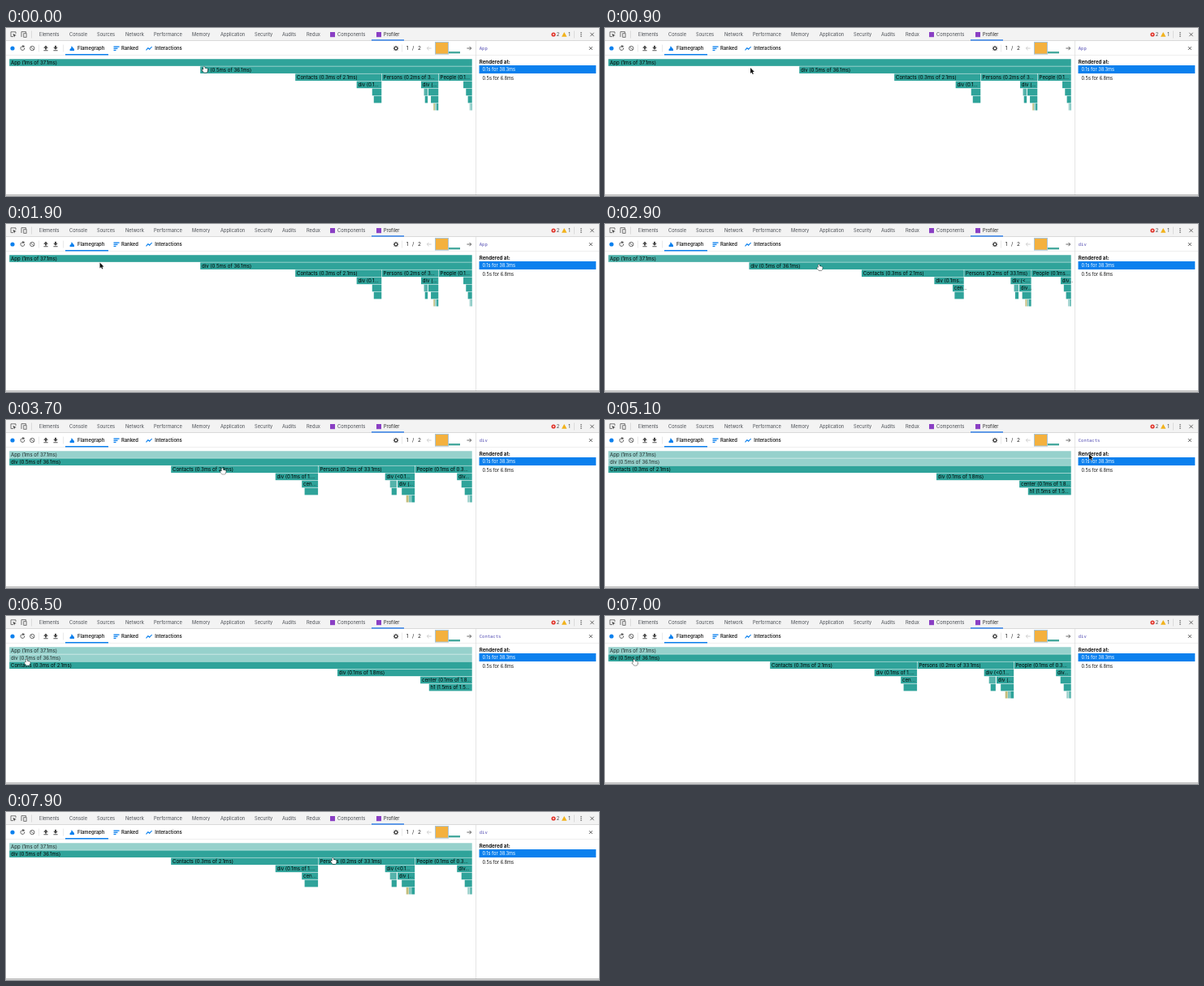
Animation of 730 by 207 pixels, one loop 8 s. Source, as an HTML page with a canvas:

```html
<!DOCTYPE html>
<html lang="en">
<head>
<meta charset="utf-8">
<title>Profiler flamegraph</title>
<style>
  html, body { margin: 0; width: 100%; height: 100%; overflow: hidden; background: #fff; }
  canvas { display: block; width: 730px; height: 207px; }
</style>
</head>
<body>
<canvas id="stage"></canvas>
<script>
const W = 730, H = 207, LOOP = 8000, STEP = 100;
const LEFT = 4, RIGHT = 574, TOP = 38, ROW = 9.1, ZOOM_MS = 250, MIN_LABEL = 18;
const SANS = 'Inter, sans-serif', MONO = '"DejaVu Sans Mono", monospace';
const TEAL = '#2fa39a', BLUE = '#0b80ee', INK = '#3c4043', PURPLE = '#8a3fc4';

const canvas = document.getElementById('stage');
const ctx = canvas.getContext('2d');
const dpr = window.devicePixelRatio || 1;
canvas.width = W * dpr;
canvas.height = H * dpr;

// Each view shows the span [from, to] across the full chart width.
const APP = { name: 'App', row: 0, from: -395.8, to: 574 };
const DIV = { name: 'div', row: 1, from: 4, to: 574 };
const CONTACTS = { name: 'Contacts', row: 2, from: 203, to: 384.4 };
const CLICKS = [
  { at: -1000, view: APP }, { at: 2816, view: DIV },
  { at: 3860, view: CONTACTS }, { at: 6750, view: DIV }
];

const bar = (row, from, to, label = '', color = TEAL) => ({ row, from, to, label, color });
const BARS = [
  bar(0, -395.8, 574, 'App (1ms of 37.1ms)'),
  bar(1, 4, 574, 'div (0.5ms of 36.1ms)'),
  bar(2, 203, 384.4, 'Contacts (0.3ms of 2.1ms)'),
  bar(2, 384.4, 503.5, 'Persons (0.2ms of 33.1ms)'),
  bar(2, 503.5, 574, 'People (0.1ms of 0.3ms)'),
  bar(3, 331.5, 384.4, 'div (0.1ms of 1.8ms)'),
  bar(3, 466.5, 503.5, 'div (<0.1ms of 32.9ms)'),
  bar(3, 555, 574, 'div (0.1ms of 0.2ms)'),
  bar(4, 364, 384.4, 'center (0.1ms of 1.8ms)'),
  bar(4, 472.5, 481.2, '', '#55b3ab'),
  bar(4, 481.8, 503.5, 'div (0.2ms of 21ms)'),
  bar(4, 560.5, 574),
  bar(5, 367.4, 384.4, 'h1 (1.5ms of 1.5ms)'),
  bar(5, 474.5, 481.2),
  bar(5, 487, 503.5),
  bar(5, 564.5, 574),
  bar(6, 492.5, 496, '', '#c3bd7c'),
  bar(6, 496, 499, '', '#6dbdb5'),
  bar(6, 499, 503.5),
  bar(6, 568, 571, '', '#9bd0cb'),
  bar(6, 571, 574, '', '#55b3ab')
];

// Pointer hot spot: time, x, y.
const POINTER = [
  [0, 244.5, 47.6], [400, 240, 49], [1400, 118, 49], [1600, 118, 49], [1900, 115.5, 47.6],
  [2700, 264, 50], [3000, 264, 50], [3700, 267, 59.5], [4100, 267, 59.5], [5100, 596, 42],
  [5600, 560, 66], [6000, 240, 110], [6300, 7, 76], [6500, 26, 53.5],
  [6900, 26, 53.5], [7900, 403, 56.8], [8000, 403, 56.8]
];

const mix = (a, b, p) => a + (b - a) * p;
const clamp = (v, lo, hi) => Math.min(hi, Math.max(lo, v));
const ease = p => p * p * (3 - 2 * p);

function rect(x, y, w, h, color) {
  ctx.fillStyle = color;
  ctx.fillRect(x, y, w, h);
}

function text(str, x, y, size, color = INK, weight = 400, family = SANS) {
  ctx.font = `${weight} ${size}px ${family}`;
  ctx.fillStyle = color;
  ctx.fillText(str, x, y);
}

function line(points, color = '#444', width = 0.8) {
  ctx.beginPath();
  points.forEach(([x, y]) => ctx.lineTo(x, y));
  ctx.strokeStyle = color;
  ctx.lineWidth = width;
  ctx.stroke();
}

function shape(points, fill) {
  ctx.beginPath();
  points.forEach(([x, y]) => ctx.lineTo(x, y));
  ctx.closePath();
  ctx.fillStyle = fill;
  ctx.fill();
}

function dot(x, y, r, color) {
  ctx.beginPath();
  ctx.arc(x, y, r, 0, 7);
  ctx.fillStyle = color;
  ctx.fill();
}

function ring(x, y, r, color = '#444', from = 0, to = 2 * Math.PI, width = 0.8) {
  ctx.beginPath();
  ctx.arc(x, y, r, from, to);
  ctx.strokeStyle = color;
  ctx.lineWidth = width;
  ctx.stroke();
}

function cross(x, y, r, color = '#444', width = 0.8) {
  line([[x - r, y - r], [x + r, y + r]], color, width);
  line([[x + r, y - r], [x - r, y + r]], color, width);
}

function arrowIcon(x, y, dir, color) {
  line([[x - 2.6, y], [x + 2.6, y]], color);
  line([[x + dir * 0.5, y - 2.2], [x + dir * 2.7, y], [x + dir * 0.5, y + 2.2]], color);
}

function drawTabs() {
  rect(0, 0, W, 15.5, '#f3f3f3');
  rect(0, 15, W, 0.7, '#cccccc');
  line([[9, 10.6], [6, 10.6], [6, 4.8], [12, 4.8], [12, 7]], '#555');
  shape([[8.4, 7], [12.8, 9], [10.9, 9.6], [10.2, 11.6]], '#444');
  line([[19, 11], [19, 4.6], [24.5, 4.6], [24.5, 6.2]], '#555');
  ctx.strokeRect(21.8, 6.7, 3.3, 4.6);
  rect(31, 3.5, 0.6, 9, '#cccccc');

  const tabs = { Elements: 41, Console: 78, Sources: 112, Network: 147, Performance: 182, Memory: 229,
    Application: 264, Security: 306, Audits: 340, Redux: 370, Components: 408, Profiler: 465 };
  for (const [name, x] of Object.entries(tabs)) {
    text(name, x, 10.2, 5.7, name === 'Profiler' ? '#222' : '#484c52');
  }
  for (const x of [399, 456]) rect(x, 5, 6, 6.2, PURPLE);
  rect(450, 14.3, 40, 1.3, '#1a73e8');

  dot(674, 8, 2.6, '#e0352b');
  cross(674, 8, 1, '#fff', 0.6);
  text('2', 677.8, 10.2, 5.8);
  shape([[687.2, 5], [690.4, 10.8], [684, 10.8]], '#f2b21b');
  text('1', 692.2, 10.2, 5.8);
  rect(699, 3.5, 0.6, 9, '#cccccc');
  for (const y of [5.7, 8, 10.3]) dot(708, y, 0.7, '#444');
  cross(721.5, 8, 2.2);
}

function drawToolbar() {
  rect(0, 33.3, W, 0.6, '#e4e4e4');
  dot(8, 25, 2.6, BLUE);
  ring(20.4, 25, 2.4, '#444', -0.3, 4.9);
  shape([[20.4, 21], [23.3, 22.6], [20.4, 24.2]], '#444');
  ring(32.3, 25, 2.7);
  line([[30.5, 23.2], [34.1, 26.8]]);
  for (const x of [40, 70, 487]) rect(x, 20.5, 0.6, 9, '#dddddd');

  shape([[49, 21.6], [51.8, 24.8], [46.2, 24.8]], '#444');
  rect(48, 24.5, 2, 2, '#444');
  rect(46.4, 27.3, 5.2, 0.9, '#444');
  shape([[61, 26.7], [63.8, 23.7], [58.2, 23.7]], '#444');
  rect(60, 21.8, 2, 2.2, '#444');
  rect(58.4, 27.3, 5.2, 0.9, '#444');

  shape([[83.2, 28], [83.2, 26], [84.6, 25], [85.4, 22], [86.8, 24], [88.6, 26], [88.6, 28]].map(([x, y]) => [x - 4.6, y]), BLUE);
  text('Flamegraph', 88, 27.1, 5.8, '#222', 600);
  rect(73, 32, 53, 1.5, BLUE);
  rect(132.5, 22.4, 7, 1.3, BLUE);
  rect(132.5, 24.6, 5, 1.3, BLUE);
  rect(132.5, 26.8, 3, 1.3, BLUE);
  text('Ranked', 142, 27.1, 5.8, '#222', 600);
  line([[172.5, 27.3], [174.9, 24.6], [176.7, 26.2], [179.6, 23]], BLUE, 1.1);
  text('Interactions', 183.3, 27.1, 5.8, '#222', 600);

  ring(480, 25, 1.9, '#444', 0, 7, 1.4);
  for (let i = 0; i < 8; i++) {
    const a = i * Math.PI / 4, c = Math.cos(a), s = Math.sin(a);
    line([[480 + c * 2.2, 25 + s * 2.2], [480 + c * 3.2, 25 + s * 3.2]], '#444', 1);
  }
  text('1', 492.8, 27.2, 6.4, '#222');
  text('/', 500, 27.2, 6.4, '#222');
  text('2', 507, 27.2, 6.4, '#222');
  arrowIcon(521, 25, -1, '#c4c4c4');
  rect(528, 17, 17, 15.6, '#a9c4d8');
  rect(529, 18, 15, 13.6, '#f4b13e');
  rect(545, 29, 14, 2.4, '#47a99e');
  arrowIcon(570, 25, 1, '#444');
}

function drawSidebar(view) {
  rect(578.3, 16, 0.7, 190, '#d8d8d8');
  text(view.name, 582.8, 26.7, 5.5, '#5650b4', 400, MONO);
  cross(719.8, 25, 2);
  text('Rendered at:', 582.8, 44.4, 6.1, '#111', 700);
  rect(582.5, 46, 143.8, 10, BLUE);
  text('0.1s for 38.3ms', 586.6, 53.2, 5.7, '#fff');
  text('0.5s for 6.8ms', 586.6, 64, 5.7, '#111');
}

function place(b, view) {
  const scale = (RIGHT - LEFT) / (view.to - view.from);
  const at = x => clamp(LEFT + (x - view.from) * scale, LEFT, RIGHT);
  return { x0: at(b.from), x1: at(b.to), alpha: b.row < view.row ? 0.5 : 1 };
}

const inView = (b, view) => b.from < view.to - 0.5 && b.to > view.from + 0.5;

function fit(label, room) {
  if (ctx.measureText(label).width <= room) return label;
  let n = label.length;
  while (n > 3 && ctx.measureText(label.slice(0, n) + '...').width > room) n--;
  return label.slice(0, n).trimEnd() + '...';
}

function layout(t) {
  const index = CLICKS.findLastIndex(c => c.at <= t);
  const { at, view } = CLICKS[index];
  const before = index ? CLICKS[index - 1].view : view;
  const p = ease(clamp((t - at) / ZOOM_MS, 0, 1));
  const bars = BARS.filter(b => inView(b, view)).map(b => {
    const goal = place(b, view);
    const start = inView(b, before) ? place(b, before) : goal;
    return {
      ...b,
      x0: mix(start.x0, goal.x0, p),
      x1: mix(start.x1, goal.x1, p),
      alpha: mix(start.alpha, goal.alpha, p),
      named: goal.x1 - goal.x0 >= MIN_LABEL
    };
  });
  return { view, bars };
}

function drawBar(b) {
  const y = TOP + b.row * ROW, w = b.x1 - b.x0;
  ctx.globalAlpha = b.alpha;
  rect(b.x0 + 0.2, y + 0.25, Math.max(0, w - 0.5), ROW - 0.5, b.color);
  ctx.globalAlpha = mix(0.8, 1, b.alpha * 2 - 1);
  if (b.label && b.named) {
    ctx.font = `400 6.1px ${SANS}`;
    text(fit(b.label, w - 3), b.x0 + 2, y + 6.7, 6.1, '#000');
  }
  ctx.globalAlpha = 1;
}

function pointerAt(t) {
  const i = Math.max(1, POINTER.findIndex(k => k[0] >= t));
  const [t0, x0, y0] = POINTER[i - 1], [t1, x1, y1] = POINTER[i];
  const p = ease((t - t0) / (t1 - t0));
  return [mix(x0, x1, p), mix(y0, y1, p)];
}

function drawPointer([x, y], bars) {
  const row = Math.floor((y - TOP) / ROW);
  const over = bars.some(b => b.row === row && x >= b.x0 && x <= b.x1);
  ctx.save();
  ctx.translate(x, y);
  ctx.lineJoin = 'round';
  ctx.beginPath();
  if (over) {
    ctx.moveTo(-1.5, 3.8);
    ctx.lineTo(-1.5, 0.3);
    ctx.quadraticCurveTo(-0.7, -0.8, 0.1, 0.3);
    ctx.lineTo(0.1, 2);
    ctx.quadraticCurveTo(3.8, 2, 3.8, 3.6);
    ctx.quadraticCurveTo(3.8, 5.8, 2.7, 7.2);
    ctx.lineTo(-1, 7.2);
    ctx.quadraticCurveTo(-2, 5.6, -3.3, 4.2);
    ctx.quadraticCurveTo(-3, 3, -1.5, 3.8);
  } else {
    for (const [px, py] of [[0, 0], [0, 6.9], [1.6, 5.5], [2.7, 7.9], [3.8, 7.4], [2.8, 5.1], [4.9, 5]]) ctx.lineTo(px, py);
  }
  ctx.closePath();
  ctx.strokeStyle = over ? '#111' : '#fff';
  ctx.lineWidth = 0.9;
  ctx.fillStyle = over ? '#fff' : '#111';
  ctx.stroke();
  ctx.fill();
  ctx.restore();
}

function draw(t) {
  ctx.setTransform(dpr, 0, 0, dpr, 0, 0);
  rect(0, 0, W, H, '#fff');
  const { view, bars } = layout(t);
  drawTabs();
  drawToolbar();
  drawSidebar(view);
  bars.forEach(drawBar);
  rect(0, 205.4, W, 1, '#8f8f8f');
  drawPointer(pointerAt(t), bars);
}

const begin = performance.now();
function tick() {
  const t = (performance.now() - begin) % LOOP;
  draw(Math.floor(t / STEP) * STEP);
  requestAnimationFrame(tick);
}
tick();
</script>
</body>
</html>
```
